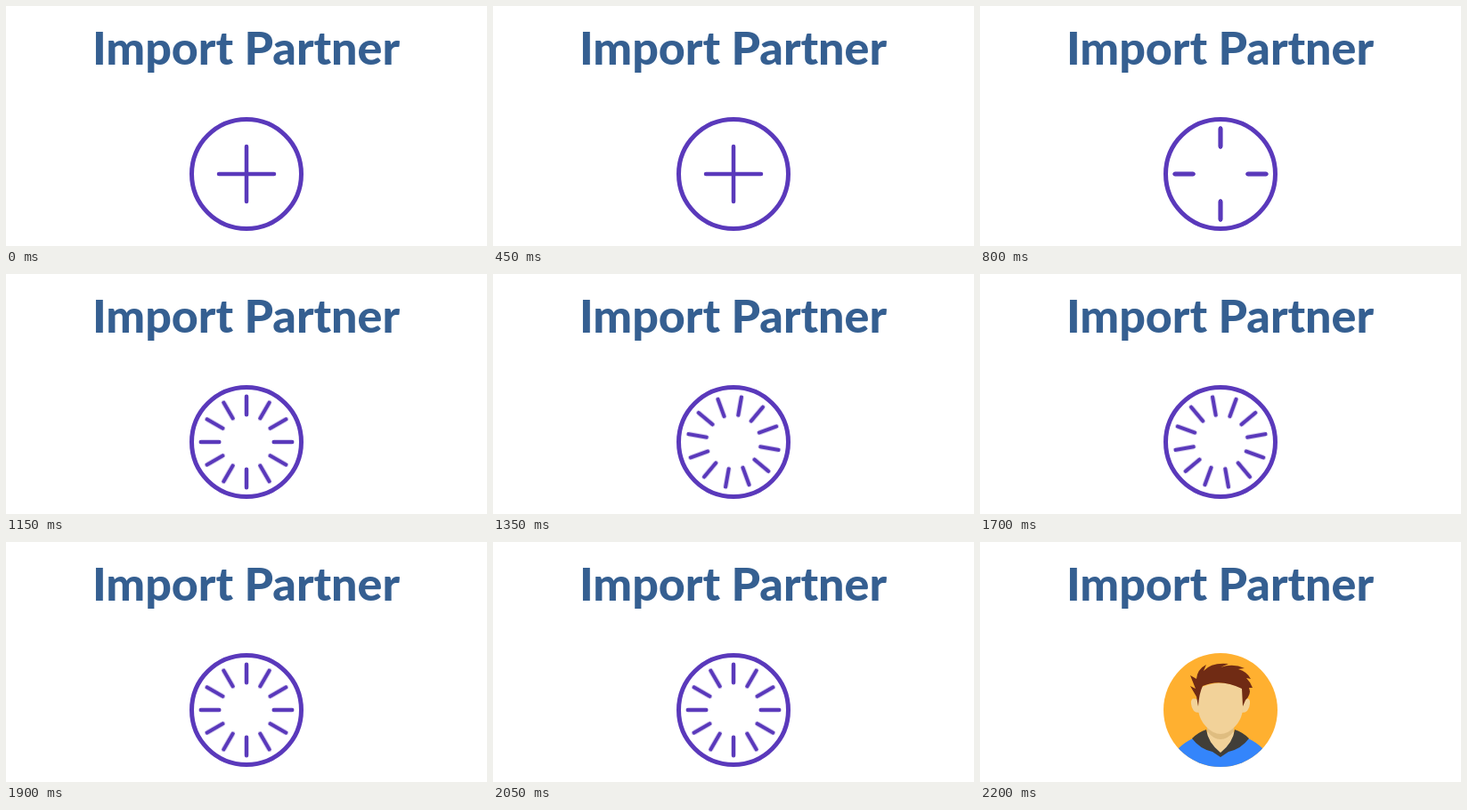
Animation of 540x270 px, one loop 2850 ms. Source, as an HTML page:

```html
<!DOCTYPE html>
<html lang="en">
<head>
<meta charset="utf-8">
<title>Import Partner</title>
<style>
  html, body { margin: 0; width: 100%; height: 100%; overflow: hidden; background: #fff; }
  svg { display: block; width: 540px; height: 270px; }
  :root { --ink: #5a39bb; }

  .title { font: 800 52px Lato, sans-serif; fill: #355f91; text-anchor: middle; }
  .ring { stroke: var(--ink); stroke-width: 5; }
  .arms { fill: none; stroke-width: 4.5; stroke-linecap: round; }

  .button, .ring, .arms, .fan, .spin, .avatar { animation: 2850ms linear infinite; }
  .button { animation-name: vanish; }
  .ring { animation-name: press; }
  .arms { animation-name: split, invert; }
  .fan { animation-name: fan; }
  .spin { animation-name: spin; }
  .avatar { animation-name: appear; }

  /* the picture advances in 50 ms ticks */
  @keyframes press {
    0%, 15.789% { fill: #fff; animation-timing-function: step-end; }
    10.526% { fill: var(--ink); animation-timing-function: step-end; }
    100% { fill: #fff; }
  }
  @keyframes invert {
    0%, 15.789% { stroke: var(--ink); animation-timing-function: step-end; }
    10.526% { stroke: #fff; animation-timing-function: step-end; }
    100% { stroke: var(--ink); }
  }
  @keyframes split {
    0% { stroke-dasharray: 31 100; stroke-dashoffset: 0; }
    17.543% { stroke-dasharray: 31 100; stroke-dashoffset: 0; animation-timing-function: steps(6); }
    28.07%, 100% { stroke-dasharray: 20.5 100; stroke-dashoffset: -30.7; }
  }
  @keyframes fan {
    0% { transform: rotate(0deg); opacity: 0; animation-timing-function: step-end; }
    28.07% { transform: rotate(0deg); opacity: 1; animation-timing-function: steps(4); }
    35.087%, 100% { transform: rotate(var(--turn)); opacity: 1; }
  }
  @keyframes spin {
    0% { transform: rotate(0deg); }
    35.087% { transform: rotate(0deg); animation-timing-function: steps(24); }
    77.192%, 100% { transform: rotate(240deg); }
  }
  @keyframes vanish {
    0% { opacity: 1; animation-timing-function: step-end; }
    77.192%, 100% { opacity: 0; }
  }
  @keyframes appear {
    0% { opacity: 0; }
    71.929% { opacity: 0; animation-timing-function: steps(3); }
    77.192%, 100% { opacity: 1; }
  }
</style>
</head>
<body>
<svg viewBox="0 0 540 270">
  <defs>
    <clipPath id="disc"><circle cx="270" cy="189" r="64"/></clipPath>
  </defs>

  <text class="title" x="269.5" y="66">Import Partner</text>

  <g class="button">
    <circle class="ring" cx="270" cy="189" r="61.5"/>
    <g transform="translate(270 189)">
      <g class="spin">
        <path class="arms" d="M0 0V-52M0 0H52M0 0V52M0 0H-52"/>
        <g class="fan" style="--turn: 30deg"><path class="arms" d="M0 0V-52M0 0H52M0 0V52M0 0H-52"/></g>
        <g class="fan" style="--turn: -30deg"><path class="arms" d="M0 0V-52M0 0H52M0 0V52M0 0H-52"/></g>
      </g>
    </g>
  </g>

  <g class="avatar">
    <circle cx="270" cy="189" r="64" fill="#ffb030"/>
    <g clip-path="url(#disc)">
      <path fill="#3485fb" d="M206 260L223 232Q230 225 241 220H299Q310 225 317 232L334 260Z"/>
      <path fill="#f2d299" d="M255 200H285V222L270 238L255 222Z"/>
      <path fill="#dfbd80" d="M255 206H285V213Q278 222 270 222T255 213Z"/>
      <path fill="#413e38" d="M238 221Q245 214 254 211Q256 226 270 237Q284 226 286 211Q295 214 302 221Q293 233 279 236L270 242L261 236Q247 233 238 221Z"/>
      <path fill="#f2d299" d="M244 177Q236 174 237 182Q238 192 246 192ZM296 177Q304 174 303 182Q302 192 294 192Z"/>
      <path fill="#f2d299" d="M245 165Q270 152 295 165V188C294 204 280 216 270 216S246 204 245 188Z"/>
      <path fill="#702b14" d="M245 185L243 174L236 162L242 165L236 150L243 154Q244 143 254 138L251 145Q260 135 279 137L270 141Q284 136 297 142L290 143Q300 146 304 154L299 153Q304 158 306 164L302 164Q305 171 298 178L295 185L294 165Q270 153 250 162Q246 170 245 185Z"/>
    </g>
  </g>
</svg>
</body>
</html>
```
